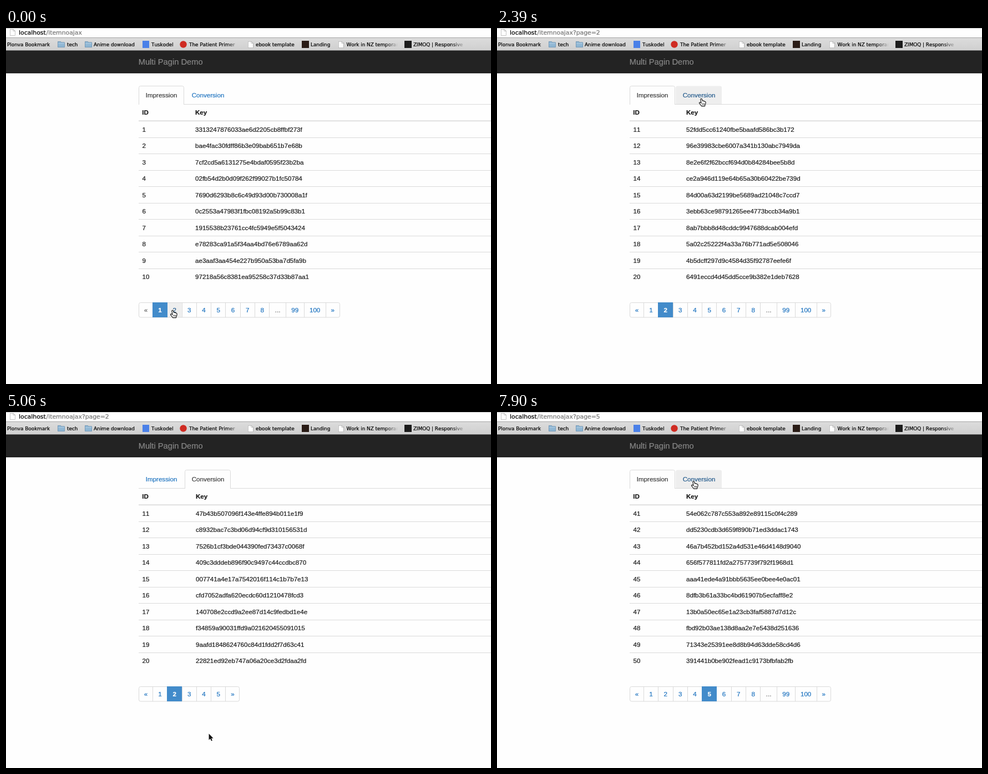
An HTML page with a canvas for the animation above (8 s loop, 874 px wide and 641 px high).

```html
<!DOCTYPE html>
<html lang="en">
<head>
<meta charset="utf-8">
<title>Multi Pagin Demo</title>
<style>
html, body { margin: 0; width: 100%; height: 100%; overflow: hidden; background: #fefefe; }
canvas { display: block; }
</style>
</head>
<body>
<canvas id="stage" width="874" height="641"></canvas>
<script>
const W = 874, H = 641, LOOP = 8000;
const ctx = document.getElementById('stage').getContext('2d');
ctx.fontKerning = 'none';

const SANS = '"Liberation Sans", Arial, sans-serif';
const UI = '"DejaVu Sans", sans-serif';
const BODY = `11.6px ${SANS}`, BOLD = `bold 11.6px ${SANS}`;
const MARK = `8.85px ${UI}`, ADDRESS = `10.85px ${UI}`;
const LINK = '#1f74c0', HOVER = '#225a8c', INK = '#1c1c1c', LINE = '#dadada', BLUE = '#428bca';

const words = s => s.trim().split(/\s+/);
const keys = {
  first: words(`3313247876033ae6d2205cb8ffbf273f bae4fac30fdff86b3e09bab651b7e68b
    7cf2cd5a6131275e4bdaf0595f23b2ba 02fb54d2b0d09f262f99027b1fc50784
    7690d6293b8c6c49d93d00b730008a1f 0c2553a47983f1fbc08192a5b99c83b1
    1915538b23761cc4fc5949e5f5043424 e78283ca91a5f34aa4bd76e6789aa62d
    ae3aaf3aa454e227b950a53ba7d5fa9b 97218a56c8381ea95258c37d33b87aa1`),
  second: words(`52fdd5cc61240fbe5baafd586bc3b172 96e39983cbe6007a341b130abc7949da
    8e2e6f2f62bccf694d0b84284bee5b8d ce2a946d119e64b65a30b60422be739d
    84d00a63d2199be5689ad21048c7ccd7 3ebb63ce98791265ee4773bccb34a9b1
    8ab7bbb8d48cddc9947688dcab004efd 5a02c25222f4a33a76b771ad5e508046
    4b5dcff297d9c4584d35f92787eefe6f 6491eccd4d45dd5cce9b382e1deb7628`),
  conversion: words(`47b43b507096f143e4ffe894b011e1f9 c8932bac7c3bd06d94cf9d310156531d
    7526b1cf3bde044390fed73437c0068f 409c3dddeb896f90c9497c44ccdbc870
    007741a4e17a7542016f114c1b7b7e13 cfd7052adfa620ecdc60d1210478fcd3
    140708e2ccd9a2ee87d14c9fedbd1e4e f34859a90031ffd9a021620455091015
    9aafd1848624760c84d1fdd2f7d63c41 22821ed92eb747a06a20ce3d2fdaa2fd`),
  fifth: words(`54e062c787c553a892e89115c0f4c289 dd5230cdb3d659f890b71ed3ddac1743
    46a7b452bd152a4d531e46d4148d9040 656f577811fd2a2757739f792f1968d1
    aaa41ede4a91bbb5635ee0bee4e0ac01 8dfb3b61a33bc4bd61907b5ecfaff8e2
    13b0a50ec65e1a23cb3faf5887d7d12c fbd92b03ae138d8aa2e7e5438d251636
    71343e25391ee8d8b94d63dde58cd4d6 391441b0be902fead1c9173bfbfab2fb`)
};

const longPager = words('« 1 2 3 4 5 6 7 8 ... 99 100 »');
const shortPager = words('« 1 2 3 4 5 »');
const views = [
  { at: 0, page: 1, tab: 0, query: '', rows: keys.first, pager: longPager },
  { at: 600, page: 2, tab: 0, query: '?page=2', rows: keys.second, pager: longPager },
  { at: 2690, page: 2, tab: 1, query: '?page=2', rows: keys.conversion, pager: shortPager },
  { at: 6560, page: 5, tab: 0, query: '?page=5', rows: keys.fifth, pager: longPager }
];

const tabs = [
  { name: 'Impression', x: 239, r: 321, text: 251.7 },
  { name: 'Conversion', x: 322, r: 405, text: 334.7 }
];

// Pointer moves: first and last step time, step count, control point, end point
const moves = [
  [150, 150, 1, 300, 508, 300, 508.5],
  [600, 600, 1, 301, 508, 301, 508],
  [1200, 1350, 2, 305, 502, 311, 492],
  [1650, 2390, 6, 330, 270, 368, 127],
  [2690, 3420, 6, 350, 180, 274, 318],
  [3570, 3720, 2, 281, 365, 302, 405],
  [3870, 4320, 4, 345, 485, 378, 513],
  [4470, 4910, 4, 389, 535, 385, 561],
  [5060, 5360, 3, 356, 596, 326, 586],
  [5510, 5810, 3, 350, 550, 378.5, 504],
  [6860, 7900, 8, 210, 330, 354, 124.5]
];

function pointerAt(t) {
  let x = 300, y = 508;
  for (const [t0, t1, n, cx, cy, ex, ey] of moves) {
    if (t < t0) break;
    const step = n > 1 ? Math.floor((t - t0) / (t1 - t0) * (n - 1) + 0.01) + 1 : 1;
    const u = Math.min(1, step / n), v = 1 - u;
    x = v * v * x + 2 * u * v * cx + u * u * ex;
    y = v * v * y + 2 * u * v * cy + u * u * ey;
  }
  return { x, y };
}

// A hairline stroke gives the heavier stems of desktop font smoothing
function text(s, x, y, font, color, align = 'left') {
  ctx.font = font;
  ctx.fillStyle = ctx.strokeStyle = color;
  ctx.textAlign = align;
  ctx.lineWidth = 0.22;
  ctx.fillText(s, x, y);
  ctx.strokeText(s, x, y);
}

function rect(x, y, w, h, color) {
  ctx.fillStyle = color;
  ctx.fillRect(x, y, w, h);
}

function shape(points, fill, stroke, width = 1) {
  ctx.beginPath();
  points.forEach(([x, y]) => ctx.lineTo(x, y));
  ctx.closePath();
  ctx.lineWidth = width;
  ctx.strokeStyle = stroke;
  ctx.stroke();
  ctx.fillStyle = fill;
  ctx.fill();
}

function sheet(x, y) {
  shape([[x, y], [x + 5.5, y], [x + 8.5, y + 3], [x + 8.5, y + 11], [x, y + 11]], '#fff', '#8c8c8c');
  shape([[x + 5.5, y], [x + 5.5, y + 3], [x + 8.5, y + 3]], '#eee', '#8c8c8c', 0.8);
}

function folder(x) {
  shape([[x, 24.5], [x + 5, 24.5], [x + 6, 26], [x + 12, 26], [x + 12, 34.5], [x, 34.5]], '#8fb6d3', '#587f9f');
  rect(x + 0.5, 27.5, 11, 1, '#b5d2e6');
}

function fadedText(s, x, end) {
  const g = ctx.createLinearGradient(end - 24, 0, end, 0);
  g.addColorStop(0, '#000');
  g.addColorStop(1, 'rgba(0,0,0,0)');
  text(s, x, 33, MARK, g);
}

function browser(query) {
  rect(0, 0, W, 17, '#fefefe');
  rect(0, 0, W, 1, '#c4c4c4');
  sheet(7.5, 2.5);
  text('localhost', 23, 12, ADDRESS, '#000');
  text('/itemnoajax' + query, 72.5, 12, ADDRESS, '#777');

  const bar = ctx.createLinearGradient(0, 17, 0, 40);
  bar.addColorStop(0, '#dcdcdc');
  bar.addColorStop(1, '#d0d0d0');
  rect(0, 17, W, 24, bar);
  rect(0, 17, W, 1, '#a4a4a4');

  const labels = [['Plonva Bookmark', 2], ['tech', 110], ['Anime download', 158],
    ['Tuskodel', 262], ['ebook template', 450], ['Landing', 549]];
  for (const [s, x] of labels) text(s, x, 33, MARK, '#000');
  fadedText('The Patient Primer', 330, 420);
  fadedText('Work in NZ temporary', 613.5, 706);
  fadedText('ZIMOQ | Responsive (', 734, 826);

  folder(93.5);
  folder(142.5);
  rect(246, 23, 12, 13, '#4a80e8');
  ctx.beginPath();
  ctx.arc(319.5, 29.5, 6.2, 0, Math.PI * 2);
  ctx.fillStyle = '#cf2b22';
  ctx.fill();
  sheet(436.5, 24.5);
  rect(533, 23, 13, 13, '#2a1c16');
  sheet(599.5, 24.5);
  rect(718, 23, 13, 13, '#1c1c1c');
}

function navbar() {
  rect(0, 40, W, 1, '#6a6a6a');
  rect(0, 41, W, 40, '#232323');
  rect(0, 80, W, 1.5, '#0c0c0c');
  text('Multi Pagin Demo', 238.7, 65.6, `14.7px ${SANS}`, '#868686');
}

function drawTabs(active, over) {
  rect(239, 137, W - 239, 1, LINE);
  tabs.forEach((tab, i) => {
    const on = i === active, hot = i === over && !on;
    ctx.beginPath();
    if (on) {
      const l = tab.x + 0.5, r = tab.r - 0.5;
      rect(tab.x, 137, tab.r - tab.x, 1, '#fefefe');
      ctx.moveTo(l, 138);
      ctx.arcTo(l, 104.5, l + 4, 104.5, 3);
      ctx.arcTo(r, 104.5, r, 110, 3);
      ctx.lineTo(r, 138);
      ctx.lineWidth = 1;
      ctx.strokeStyle = LINE;
      ctx.stroke();
    } else if (hot) {
      ctx.roundRect(tab.x, 104.5, tab.r - tab.x, 32.5, [3, 3, 0, 0]);
      ctx.fillStyle = '#eee';
      ctx.fill();
    }
    text(tab.name, tab.text, 125.2, BODY, on ? '#3c3c3c' : hot ? HOVER : LINK);
  });
}

function table(view) {
  const keyX = 341 + view.tab;
  text('ID', 245.3, 156.4, BOLD, INK);
  text('Key', keyX, 156.4, BOLD, INK);
  rect(239, 166.5, W - 239, 1.6, LINE);
  view.rows.forEach((key, i) => {
    const y = 186.8 + i * 29.5;
    text((view.page - 1) * 10 + i + 1, 245.5, y, BODY, INK);
    text(key, keyX, y, BODY, INK);
    if (i < 9) rect(239, Math.round(196.8 + i * 29.5), W - 239, 1, LINE);
  });
}

function pagerCells(labels) {
  ctx.font = BODY;
  let x = 239;
  return labels.map(s => {
    const w = '«»'.includes(s) ? 25 : ctx.measureText(s).width + 19.85;
    const cell = { s, x, w };
    x += w;
    return cell;
  });
}

function drawPager(cells, page, over) {
  const last = cells[cells.length - 1];
  const current = cells.find(c => c.s === String(page));
  for (const c of cells) {
    if (c === over) rect(c.x, 494, c.w, 27, '#eee');
    if (c.x > 239) rect(Math.round(c.x), 494, 1, 27, LINE);
  }
  ctx.beginPath();
  ctx.roundRect(239.5, 494.5, Math.round(last.x + last.w) - 239, 26.5, 3);
  ctx.strokeStyle = LINE;
  ctx.lineWidth = 1;
  ctx.stroke();
  rect(Math.round(current.x), 494, 27, 27, BLUE);

  for (const c of cells) {
    const on = c === current;
    const dead = c.s === '...' || (c.s === '«' && page === 1);
    const color = on ? '#fff' : dead ? '#666' : c === over ? HOVER : LINK;
    text(c.s, c.x + c.w / 2 + 0.4, 511.9, on ? BOLD : BODY, color, 'center');
  }
}

const arrow = [[0, 0], [0, 11.2], [2.6, 8.9], [4.4, 13], [6.3, 12.2], [4.5, 8.2], [8, 8.2]];

function drawPointer({ x, y }, hand) {
  ctx.save();
  ctx.translate(x, y);
  ctx.lineJoin = 'round';
  if (!hand) {
    shape(arrow, '#111', '#fff', 1.6);
  } else {
    ctx.beginPath();
    ctx.moveTo(-1.2, 1.2);
    ctx.quadraticCurveTo(0, -0.6, 1.4, 1);
    ctx.lineTo(2.2, 4.2);
    ctx.quadraticCurveTo(3.6, 3.4, 4.4, 4.8);
    ctx.quadraticCurveTo(5.8, 4.1, 6.5, 5.5);
    ctx.quadraticCurveTo(8, 5.2, 8.1, 7);
    ctx.quadraticCurveTo(8.1, 9.5, 6.9, 11.4);
    ctx.lineTo(6.6, 13.6);
    ctx.lineTo(0.4, 13.6);
    ctx.quadraticCurveTo(-1.2, 10.8, -3.4, 8.6);
    ctx.quadraticCurveTo(-4, 6.6, -1.8, 6.9);
    ctx.lineTo(0, 8.2);
    ctx.closePath();
    ctx.fillStyle = '#fff';
    ctx.fill();
    ctx.strokeStyle = '#111';
    ctx.lineWidth = 1.1;
    ctx.stroke();
    ctx.beginPath();
    for (const k of [1.8, 3.6, 5.4]) {
      ctx.moveTo(k, 8.6);
      ctx.lineTo(k + 0.2, 11.4);
    }
    ctx.lineWidth = 0.8;
    ctx.stroke();
  }
  ctx.restore();
}

function draw(t) {
  const view = views.filter(v => v.at <= t).pop();
  const p = pointerAt(t);
  const cells = pagerCells(view.pager);
  const overTab = p.y > 104 && p.y < 137 ? tabs.findIndex(b => p.x >= b.x && p.x < b.r) : -1;
  const overCell = p.y > 494 && p.y < 521 ? cells.find(c => p.x >= c.x && p.x < c.x + c.w) : undefined;

  rect(0, 0, W, H, '#fefefe');
  browser(view.query);
  navbar();
  drawTabs(view.tab, overTab);
  table(view);
  drawPager(cells, view.page, overCell);
  drawPointer(p, Boolean(overCell) || (overTab >= 0 && overTab !== view.tab));
}

const start = performance.now();
function tick() {
  draw((performance.now() - start) % LOOP);
  requestAnimationFrame(tick);
}
tick();
</script>
</body>
</html>
```
